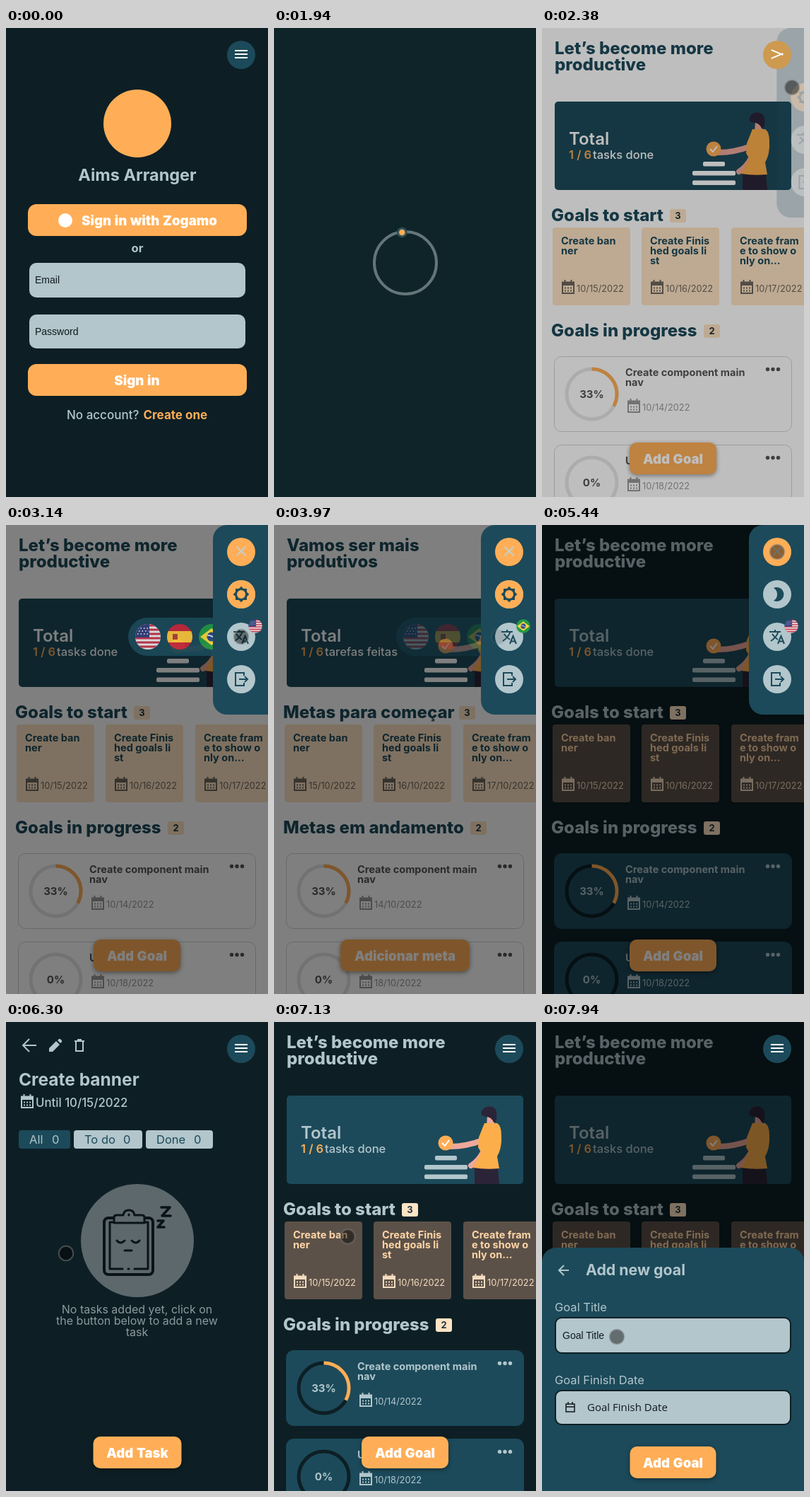
Recreate the animation shown at these times as an HTML page. Size 371 by 663 pixels, loop 8 s.

```html
<!DOCTYPE html>
<html lang="en">
<head>
<meta charset="utf-8">
<title>Goal app tour</title>
<style>
@property --d { syntax: "<number>"; inherits: true; initial-value: 0; }
html, body { margin: 0; width: 100%; height: 100%; overflow: hidden; background: #0d1f25; }
svg { display: block; width: 100%; height: 100%; font: 16px Inter, sans-serif; }
#stage {
  --night: #0d1f25; --teal: #1c4a5a; --mist: #b2c6cc; --orange: #ffae57;
  --mix: calc(var(--d) * 100%);
  --bg: color-mix(in srgb, var(--night) var(--mix), #fff);
  --ink: color-mix(in srgb, var(--mist) var(--mix), var(--teal));
  --total: color-mix(in srgb, var(--mist) var(--mix), #fff);
  --card: color-mix(in srgb, #5c5148 var(--mix), #ffe4c4);
  --card-ink: color-mix(in srgb, #ffd5a6 var(--mix), var(--teal));
  --card-date: color-mix(in srgb, #f3dcc0 var(--mix), #6d665c);
  --item: color-mix(in srgb, var(--teal) var(--mix), #fff);
  --edge: color-mix(in srgb, var(--teal) var(--mix), #d2d2d2);
  --item-ink: color-mix(in srgb, var(--mist) var(--mix), #555);
  --date: color-mix(in srgb, var(--mist) var(--mix), #999);
  --track: color-mix(in srgb, var(--night) var(--mix), #e6e6e6);
  animation: theme 8s linear infinite;
}
.h { font-size: 24px; font-weight: 800; fill: var(--ink); }
.cta { font-size: 18.6px; font-weight: 900; word-spacing: 1px; fill: #fff; }
.b { font-weight: 700; }
.m { text-anchor: middle; }
.mist { fill: var(--mist); }
.orange { fill: var(--orange); }
.teal { fill: var(--teal); }
.field { font: 14px "Liberation Sans", Arial, sans-serif; fill: #10191c; }
.small { font-size: 14.5px; font-weight: 750; }
.date { font-size: 12.8px; }
.line { fill: none; stroke: currentColor; stroke-width: 2; }
.shadow { filter: drop-shadow(0 2px 3px #0006); }

#login { animation: login 8s linear infinite; }
#loader { animation: loader 8s linear infinite; }
#dot { transform-origin: 186px 332px; animation: orbit 1s linear infinite; }
#home { animation: home 8s linear infinite; }
#detail { animation: detail 8s linear infinite; }
#shade { animation: shade 8s linear infinite; }
#pill { animation: pill 8s linear infinite; }
#panel { animation: panel 8s linear infinite; }
#menu { animation: menu 8s linear infinite; }
#disc { animation: disc 8s linear infinite; }
#bars { stroke-width: 2; animation: bars 8s linear infinite; }
#bar1 { transform-origin: 333px 32px; animation: bar1 8s linear infinite; }
#bar2 { animation: bar2 8s linear infinite; }
#bar3 { transform-origin: 333px 42px; animation: bar3 8s linear infinite; }
#modal { animation: modal 8s ease-out infinite; }
#cursor { animation: cursor 8s ease-in-out infinite; }
.en { animation: english 8s step-end infinite; }
.pt { animation: portuguese 8s step-end infinite; }
.sun { opacity: calc(1 - var(--d)); }
.moon { opacity: var(--d); }

@keyframes theme { 0%, 64.2% { --d: 0 } 66%, 100% { --d: 1 } }
@keyframes login { 0%, 6.5% { opacity: 1 } 9.5%, 100% { opacity: 0 } }
@keyframes loader { 0%, 8.5% { opacity: 0 } 11%, 25.5% { opacity: 1 } 27%, 100% { opacity: 0 } }
@keyframes orbit { from { transform: rotate(15deg) } to { transform: rotate(375deg) } }
@keyframes home { 0%, 25.5% { opacity: 0 } 27.2%, 77.2% { opacity: 1 } 77.7%, 86% { opacity: 0 } 86.6%, 100% { opacity: 1 } }
@keyframes detail { 0%, 77.2% { opacity: 0 } 77.7%, 86% { opacity: 1 } 86.6%, 100% { opacity: 0 } }
@keyframes shade { 0%, 29% { opacity: 0 } 30.5%, 68.4% { opacity: .5 } 70.2%, 94.3% { opacity: 0 } 96.5%, 100% { opacity: .5 } }
@keyframes pill { 0%, 38% { opacity: 0 } 39.4%, 48.6% { opacity: 1 } 50%, 54% { opacity: 0 } 55.4%, 59.5% { opacity: 1 } 61%, 100% { opacity: 0 } }
@keyframes panel {
  0%, 29% { transform: translateX(78px); opacity: 0 }
  29.75% { transform: translateX(40px); opacity: .2 }
  30.5%, 68.4% { transform: none; opacity: 1 }
  70.2%, 100% { transform: translateX(78px); opacity: 0 }
}
@keyframes menu { 0%, 6.5% { opacity: 1 } 9.5%, 26% { opacity: 0 } 27.5%, 100% { opacity: 1 } }
@keyframes disc { 0%, 29% { fill: #1c4a5a } 29.75% { fill: #cd9a50 } 30.5%, 68.4% { fill: #ffae57 } 70.2%, 100% { fill: #1c4a5a } }
@keyframes bars { 0%, 29.75% { stroke: #fff } 30.5%, 68.4% { stroke: #c9ccc4 } 70.2%, 100% { stroke: #fff } }
@keyframes bar1 { 0%, 29%, 70.2%, 100% { transform: none } 30.5%, 68.4% { transform: translateY(5px) rotate(45deg) } }
@keyframes bar2 { 0%, 29%, 70.2%, 100% { opacity: 1 } 29.75%, 68.4% { opacity: 0 } }
@keyframes bar3 { 0%, 29%, 70.2%, 100% { transform: none } 30.5%, 68.4% { transform: translateY(-5px) rotate(-45deg) } }
@keyframes modal { 0%, 94.3% { transform: translateY(344px) } 98.6%, 100% { transform: none } }
@keyframes english { 0% { opacity: 1 } 48.5% { opacity: 0 } 59.25%, 100% { opacity: 1 } }
@keyframes portuguese { 0% { opacity: 0 } 48.5% { opacity: 1 } 59.25%, 100% { opacity: 0 } }
@keyframes cursor {
  0%, 1% { transform: translate(-14px, 640px); opacity: 1 }
  5.6%, 7.5% { transform: translate(190px, 272px); opacity: 1 }
  9.5% { transform: translate(190px, 272px); opacity: 0 }
  27% { transform: translate(300px, 70px); opacity: 0 }
  27.6% { transform: translate(320px, 50px); opacity: 1 }
  28.4%, 29% { transform: translate(334px, 40px) }
  29.75%, 31.7% { transform: translate(354px, 84px) }
  36.5%, 41% { transform: translate(333px, 158px) }
  46%, 48.4% { transform: translate(291px, 158px); opacity: 1 }
  49.63% { transform: translate(318px, 158px); opacity: .25 }
  51%, 54.5% { transform: translate(333px, 158px); opacity: 1 }
  58%, 59.5% { transform: translate(201px, 158px) }
  61.9%, 65% { transform: translate(333px, 99px) }
  67.5%, 69.5% { transform: translate(333px, 38px) }
  76%, 79.75% { transform: translate(85px, 327px) }
  83.2%, 86% { transform: translate(33px, 33px) }
  92.5%, 94% { transform: translate(185px, 608px) }
  98.8%, 100% { transform: translate(106px, 445px); opacity: 1 }
}
</style>
</head>
<body>
<svg id="stage" viewBox="0 0 371 663">
  <defs>
    <clipPath id="round"><circle r="18"/></clipPath>
    <g id="calendar">
      <path class="line" d="M1 3.5H17V19H1ZM4.5 0V4M13.5 0V4"/>
      <path d="M1 3H17V8H1Z" fill="currentColor"/>
      <path class="line" stroke-dasharray="2 2" d="M4 11.5H14M4 15.5H14"/>
    </g>
    <g id="us" clip-path="url(#round)">
      <path fill="#eee" d="M-18-18H18V18H-18Z"/>
      <path stroke="#c9344a" stroke-width="3" d="M-18-16H18M-18-10H18M-18-4H18M-18 2H18M-18 8H18M-18 14H18"/>
      <path fill="#35407c" d="M-18-18H2V1H-18Z"/>
      <path stroke="#fff" stroke-width="1.5" stroke-dasharray="1.5 3" d="M-15-12H1M-13-8H1M-15-4H1"/>
    </g>
    <g id="es" clip-path="url(#round)">
      <path fill="#c8283c" d="M-18-18H18V18H-18Z"/>
      <path fill="#ffc83c" d="M-18-8H18V8H-18Z"/>
      <path fill="#b5443a" d="M-10-4H-3V4H-10Z"/>
    </g>
    <g id="br" clip-path="url(#round)">
      <path fill="#229a45" d="M-18-18H18V18H-18Z"/>
      <path fill="#fadb3c" d="M-16 0L0-12L16 0L0 12Z"/>
      <circle r="6.5" fill="#2b4a8c"/>
      <path d="M-6-2Q1-2 6 3" fill="none" stroke="#fff" stroke-width="1.5"/>
    </g>
  </defs>

  <g id="home">
    <rect width="371" height="663" fill="var(--bg)"/>
    <g class="h en"><text x="18" y="37">Let’s become more</text><text x="18" y="60">productive</text></g>
    <g class="h pt"><text x="18" y="37">Vamos ser mais</text><text x="18" y="60">produtivos</text></g>

    <rect class="teal" x="18" y="104" width="335" height="125" rx="5"/>
    <g fill="var(--total)">
      <text x="38" y="165" font-size="24" font-weight="600">Total</text>
      <g font-size="16.5" font-weight="500">
        <text class="orange" x="38" y="185" font-weight="600">1 / 6</text>
        <text class="en" x="72" y="185">tasks done</text>
        <text class="pt" x="72" y="185">tarefas feitas</text>
      </g>
      <rect x="228" y="189" width="31" height="6.5" rx="2"/>
      <rect x="213" y="202" width="61" height="6.5" rx="2"/>
      <rect x="213" y="215.5" width="61" height="6.5" rx="2"/>
    </g>
    <path d="M284 204H317L319 229H284Z" fill="#2b2438"/>
    <path d="M250 176Q272 176 296 167M296 184Q290 196 279 203" fill="none" stroke="#eea89c" stroke-width="8" stroke-linecap="round"/>
    <path d="M302 132H312V148H301Z" fill="#eea89c"/>
    <path d="M290 163L298 143H316Q322 147 322 160Q323 178 316 190L319 207Q300 209 282 206L293 184L289 177Z" fill="#fcae4b"/>
    <path d="M294 126Q299 117 309 120Q317 123 315 134Q316 141 311 142Q308 134 300 134Q292 133 294 126Z" fill="#2b2438"/>
    <circle class="orange" cx="243" cy="171" r="10.5"/>
    <path d="M238 171L242 175L248 167" fill="none" stroke="#fff" stroke-width="2"/>

    <text class="h en" x="13" y="273">Goals to start</text>
    <text class="h pt" x="13" y="273">Metas para começar</text>
    <text class="h en" x="13" y="436">Goals in progress</text>
    <text class="h pt" x="13" y="436">Metas em andamento</text>
    <g id="badges"></g>
    <g id="goals"></g>
    <g id="items"></g>
    <g class="en shadow"><rect class="orange" x="124" y="586" width="123" height="45" rx="10"/><text class="cta m" x="185.5" y="616">Add Goal</text></g>
    <g class="pt shadow"><rect class="orange" x="94" y="586" width="183" height="45" rx="10"/><text class="cta m" x="185.5" y="616">Adicionar meta</text></g>
  </g>

  <g id="detail" color="#b2c6cc">
    <rect width="371" height="663" fill="var(--night)"/>
    <path class="line" d="M43 33H25M33 24L24 33L33 42"/>
    <path fill="currentColor" d="M61 42V37L71 27L76 32L66 42ZM73 26L75 24Q76 23 78 25Q80 27 79 28L77 30Z"/>
    <path class="line" d="M97 27H111M101 25H107M99 27V41H109V27"/>
    <g class="mist">
      <text x="18" y="90" font-size="24.5" font-weight="700">Create banner</text>
      <use href="#calendar" x="21" y="102"/>
      <text x="42" y="120" font-size="16.8" font-weight="500">Until 10/15/2022</text>
      <rect class="teal" x="18" y="153" width="73" height="26" rx="4"/>
      <rect x="96" y="153" width="97" height="26" rx="4"/>
      <rect x="198" y="153" width="95" height="26" rx="4"/>
      <g font-size="16.5"><text x="33" y="171.5">All</text><text x="65" y="171.5">0</text>
        <g class="teal"><text x="111" y="171.5">To do</text><text x="166" y="171.5">0</text><text x="213" y="171.5">Done</text><text x="266" y="171.5">0</text></g>
      </g>
    </g>
    <circle cx="186" cy="309" r="80" fill="#5d686c"/>
    <g fill="none" stroke="#0a1318" stroke-width="4" stroke-linecap="round" stroke-linejoin="round">
      <rect x="139" y="277" width="69" height="80" rx="6"/>
      <path stroke-width="3" d="M152 283H147V349H165M173 349H174M182 349H201V283H196"/>
      <path fill="#5d686c" stroke-width="3" d="M153 284V276Q153 273 157 273H166Q167 266 174 266T182 273H192Q196 273 196 276V284Z"/>
      <path stroke-width="3" d="M157 309Q162 315 168 309M178 309Q184 315 189 309M168 323H178M174 272V273"/>
      <path stroke-width="3.5" d="M220 262H232L221 274H233M215 281H223L215 290H224"/>
    </g>
    <g class="m" fill="#8d999d"><text x="185.5" y="412">No tasks added yet, click on</text><text x="185.5" y="428">the button below to add a new</text><text x="185.5" y="444">task</text></g>
    <g class="shadow"><rect class="orange" x="123.5" y="586" width="125" height="45" rx="10"/><text class="cta m" x="186" y="616">Add Task</text></g>
  </g>

  <rect id="shade" width="371" height="663"/>

  <g id="login">
    <rect width="371" height="663" fill="var(--night)"/>
    <circle class="orange" cx="186" cy="135" r="48"/>
    <g class="mist m b">
      <text x="186" y="216" font-size="23.5">Aims Arranger</text>
      <text x="186" y="317" font-size="16.5">or</text>
    </g>
    <rect class="orange" x="31" y="249" width="310" height="45" rx="12"/>
    <circle cx="84" cy="272" r="10" fill="#fff"/>
    <text class="cta" x="107" y="279">Sign in with Zogamo</text>
    <rect class="mist" x="33" y="332" width="306" height="49" rx="10"/>
    <text class="field" x="41" y="361">Email</text>
    <rect class="mist" x="33" y="405" width="306" height="48" rx="10"/>
    <text class="field" x="41" y="434">Password</text>
    <rect class="orange" x="31" y="475" width="310" height="45" rx="12"/>
    <text class="cta m" x="185.5" y="505">Sign in</text>
    <text class="mist" x="86" y="553" font-size="17" font-weight="500">No account?</text>
    <text class="orange b" x="194.5" y="553" font-size="17">Create one</text>
  </g>

  <g id="loader">
    <rect width="371" height="663" fill="#0f2429"/>
    <circle cx="186" cy="332" r="44" fill="none" stroke="#64767a" stroke-width="4"/>
    <circle id="dot" class="orange" cx="186" cy="288.7" r="5.8" stroke="#2c4f5a" stroke-width="3"/>
  </g>

  <g id="pill">
    <rect class="teal" x="173" y="131" width="147" height="54" rx="27"/>
    <use href="#us" x="201" y="158"/><use href="#es" x="246" y="158"/><use href="#br" x="291" y="158"/>
  </g>

  <g id="panel" color="#1c4a5a">
    <rect class="teal" x="293" width="120" height="268" rx="20"/>
    <g class="mist"><circle cx="333" cy="98" r="20"/><circle cx="333" cy="158" r="20"/><circle cx="333" cy="218" r="20"/></g>
    <g class="sun" transform="translate(333 98)">
      <circle class="orange" r="20"/>
      <path class="teal" d="M-8-8H8V8H-8Z"/><path class="teal" transform="rotate(45)" d="M-8-8H8V8H-8Z"/>
      <circle class="orange" r="6"/>
    </g>
    <path class="moon teal" transform="translate(333 98)" d="M-5-9A10 10 0 1 1-5 9A10.5 10.5 0 0 0-5-9Z"/>
    <path class="line" transform="translate(321 146)" d="M1 5H17M9 2V5M13.5 5Q11 13 3 18M5 8Q8 13 13 16M13 22L17.5 11L22 22M14.5 18.5H20.5"/>
    <path class="line" transform="translate(333 218)" d="M4-5V-9H-8V9H4V5M-3 0H9M5-4L9 0L5 4"/>
    <g transform="translate(353 143) scale(.55)"><use class="en" href="#us"/><use class="pt" href="#br"/></g>
  </g>

  <g id="menu">
    <circle id="disc" cx="333" cy="38" r="20"/>
    <g id="bars"><path id="bar1" d="M324 32H342"/><path id="bar2" d="M324 37H342"/><path id="bar3" d="M324 42H342"/></g>
  </g>

  <g id="modal" color="#b2c6cc">
    <rect class="teal" y="319" width="371" height="370" rx="20"/>
    <path class="line" d="M38 351H24M31 344L24 351L31 358"/>
    <g class="mist">
      <text class="b" x="62" y="358" font-size="21.3">Add new goal</text>
      <g font-size="16.5"><text x="18" y="409">Goal Title</text><text x="18" y="512">Goal Finish Date</text></g>
      <g stroke="#0d1f25" stroke-width="2"><rect x="19" y="418" width="333" height="50" rx="9"/><rect x="19" y="521" width="333" height="48" rx="9"/></g>
    </g>
    <text class="field" x="29" y="448">Goal Title</text>
    <path fill="none" stroke="#10191c" stroke-width="1.5" d="M34 540H46V551H34ZM34 544H46M37 537V541M43 537V541"/>
    <text x="64" y="550" style="font:15px 'Open Sans',sans-serif" fill="#10191c">Goal Finish Date</text>
    <g class="shadow"><rect class="orange" x="124.5" y="600" width="122" height="45" rx="10"/><text class="cta m" x="185.5" y="630">Add Goal</text></g>
  </g>

  <circle id="cursor" r="10.2" fill="#000" fill-opacity=".45" stroke="#808080" stroke-opacity=".5" stroke-width="2"/>
</svg>
<script>
const fill = (id, list, draw) =>
  document.getElementById(id).innerHTML = list.map(draw).join("");

const lines = (rows, x, y) =>
  rows.map((row, i) => `<text class="small" x="${x}" y="${y + i * 14}">${row}</text>`).join("");

const dateRow = (day, x, y, color) => `<g color="${color}" fill="${color}">
  <use href="#calendar" x="${x}" y="${y}"/>
  <text class="date en" x="${x + 21}" y="${y + 17}">10/${day}/2022</text>
  <text class="date pt" x="${x + 21}" y="${y + 17}">${day}/10/2022</text></g>`;

fill("badges", [["en", 181, 256, 3], ["pt", 262, 256, 3], ["en", 229, 419, 2], ["pt", 278, 419, 2]],
  ([lang, x, y, count]) => `<g class="${lang}">
    <rect x="${x}" y="${y}" width="23" height="19" rx="3" fill="#ffe4c4"/>
    <text class="b m" x="${x + 11.5}" y="${y + 14}" font-size="13" fill="#20343c">${count}</text></g>`);

fill("goals", [
  [15, 15, ["Create ban", "ner"]],
  [141, 16, ["Create Finis", "hed goals li", "st"]],
  [268, 17, ["Create fram", "e to show o", "nly on..."]]
], ([x, day, rows]) => `<rect x="${x}" y="282" width="110" height="110" rx="4" fill="var(--card)"/>
  <g fill="var(--card-ink)">${lines(rows, x + 12, 306)}</g>
  ${dateRow(day, x + 13, 356, "var(--card-date)")}`);

fill("items", [
  [464.5, 33, 14, ["Create component main", "nav"]],
  [589.5, 0, 18, ["Update list"]]
], ([y, percent, day, rows]) => `
  <rect x="17.5" y="${y}" width="336" height="106" rx="10" fill="var(--item)" stroke="var(--edge)"/>
  <g fill="none" stroke-width="5" transform="translate(70.5 ${y + 53}) rotate(-90)">
    <circle r="35.5" stroke="var(--track)"/>
    ${percent ? `<circle r="35.5" stroke="var(--orange)" pathLength="100" stroke-dasharray="${percent} 100"/>` : ""}
  </g>
  <g fill="var(--item-ink)">
    <text class="b m" x="70.5" y="${y + 58.5}" font-size="15">${percent}%</text>
    ${lines(rows, 118, y + 27.5)}
    ${[319.5, 327, 334.5].map(x => `<circle cx="${x}" cy="${y + 18}" r="2.7"/>`).join("")}
  </g>
  ${dateRow(day, 121, y + 31.5 + rows.length * 14, "var(--date)")}`);
</script>
</body>
</html>
```
